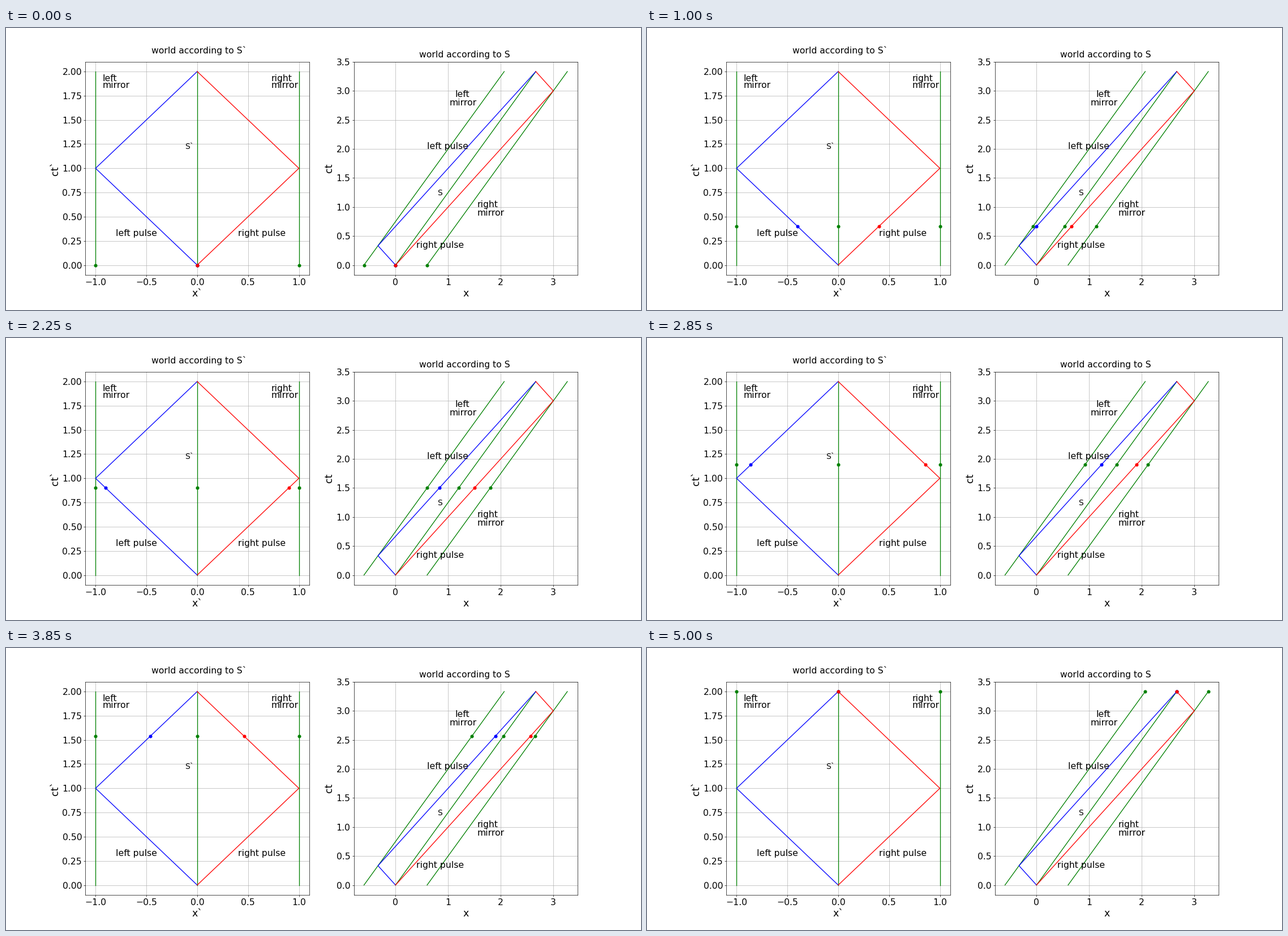
A matplotlib script for the animation above (5.05 s loop, 1122 px wide and 499 px high).

```python
import numpy as np
import matplotlib.pyplot as plt
from matplotlib.animation import FuncAnimation

W, H, DPI = 1122, 499, 62.5
FRAMES, INTERVAL = 101, 50
BETA = 0.8
GAMMA = 1 / np.sqrt(1 - BETA ** 2)
COLORS = ["green", "green", "green", "blue", "red"]

plt.rcParams.update({"font.family": "DejaVu Sans", "font.size": 18})


def to_lab(x, t):
    """Lorentz transform from the moving frame S` to S."""
    return GAMMA * (x + BETA * t), GAMMA * (t + BETA * x)


def path(*events):
    return np.array(events, float).T


# World lines in S`: left mirror, observer, right mirror, two light pulses
rest_paths = [path((x, 0), (x, 2)) for x in (-1, 0, 1)]
rest_paths += [path((0, 0), (x, 1), (0, 2)) for x in (-1, 1)]

# The same in S; the mirrors are length contracted and start at t = 0
t_end = 2 * GAMMA
lab_paths = [path((x / GAMMA, 0), (x / GAMMA + BETA * t_end, t_end))
             for x in (-1, 0, 1)]
lab_paths += [np.array(to_lab(x, t)) for x, t in rest_paths[3:]]


def draw_panel(ax, paths, labels, xlabel, ylabel):
    for (x, t), color in zip(paths, COLORS):
        ax.plot(x, t, color=color, lw=1.5)
    dots = [ax.plot([x[0]], [t[0]], "o", color=color, ms=6)[0]
            for (x, t), color in zip(paths, COLORS)]
    for x, y, text, size in labels:
        ax.text(x, y, text, fontsize=size)
    ax.set_xlabel(xlabel, fontsize=20)
    ax.set_ylabel(ylabel, fontsize=20)
    ax.grid(True)
    return dots


fig, (ax1, ax2) = plt.subplots(1, 2, figsize=(W / DPI, H / DPI), dpi=DPI)
fig.subplots_adjust(left=0.125, right=0.9, bottom=0.125, top=0.88, wspace=0.2)

rest_dots = draw_panel(ax1, rest_paths, [
    (-0.45, 2.185, "world according to S`", 18),
    (-0.93, 1.9, "left", 18),
    (-0.93, 1.83, "mirror", 18),
    (0.73, 1.9, "right", 18),
    (0.73, 1.83, "mirror", 18),
    (-0.8, 0.3, "left pulse", 18),
    (0.4, 0.3, "right pulse", 18),
    (-0.12, 1.2, "S`", 16),
], "x`", "ct`")
ax1.set(xlim=(-1.1, 1.1), ylim=(-0.1, 2.1))

lab_dots = draw_panel(ax2, lab_paths, [
    (0.45, 3.58, "world according to S", 18),
    (1.13, 2.9, "left", 18),
    (1.03, 2.75, "mirror", 18),
    (1.55, 1.0, "right", 18),
    (1.55, 0.85, "mirror", 18),
    (0.6, 2.0, "left pulse", 18),
    (0.4, 0.3, "right pulse", 18),
    (0.8, 1.2, "S", 16),
], "x", "ct")
margin = 0.05 * (2 / GAMMA + BETA * t_end)
ax2.set(xlim=(-1 / GAMMA - margin, 1 / GAMMA + BETA * t_end + margin),
        ylim=(-0.05 * t_end, 1.05 * t_end))


def move(dots, paths, now):
    for dot, (x, t) in zip(dots, paths):
        dot.set_data([np.interp(now, t, x)], [now])


def update(frame):
    s = frame / (FRAMES - 1)
    move(rest_dots, rest_paths, 2 * s)
    move(lab_dots, lab_paths, t_end * s)
    return rest_dots + lab_dots


anim = FuncAnimation(fig, update, frames=FRAMES, interval=INTERVAL,
                     repeat=True, repeat_delay=0, blit=False)
plt.show()
```
